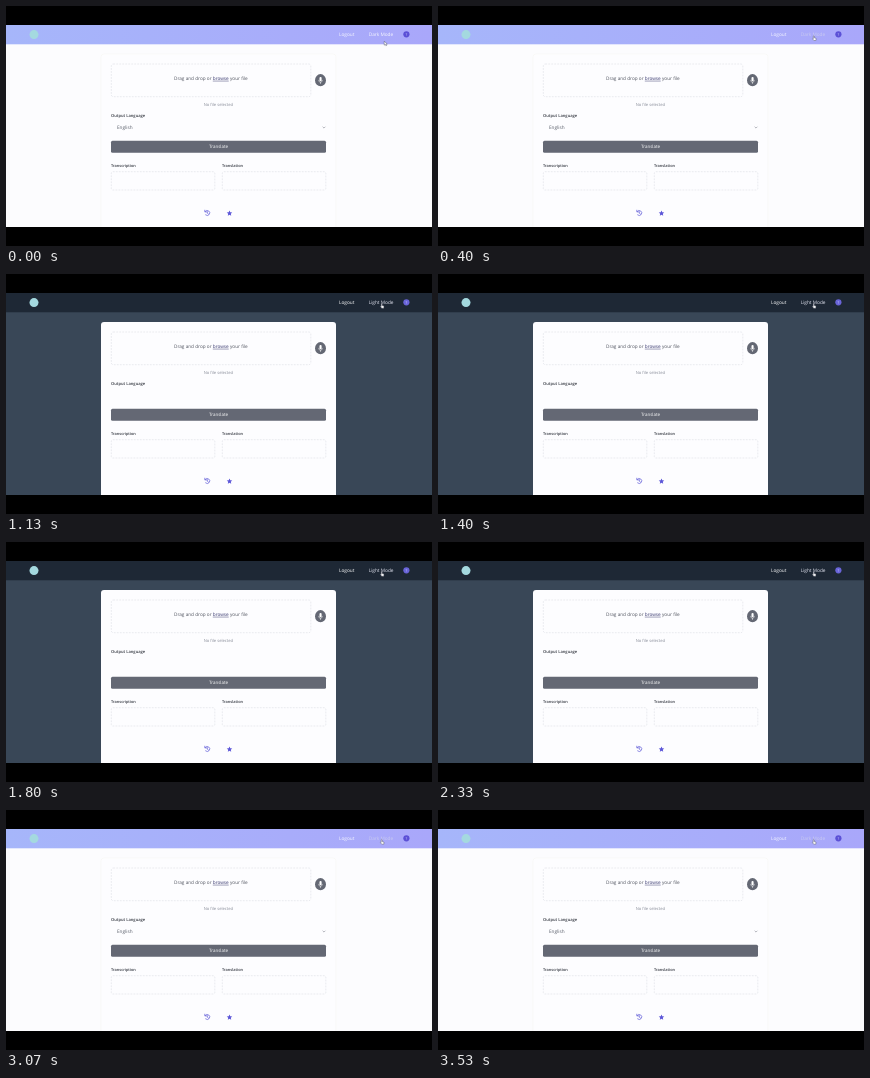
An HTML page for the animation above (3590 ms loop, 426 px wide and 240 px high).

```html
<!DOCTYPE html>
<html lang="en">
<head>
<meta charset="utf-8">
<title>Theme toggle</title>
<style>
  html, body { margin: 0; width: 100%; height: 100%; overflow: hidden; background: #000; }
  svg {
    display: block; width: 426px; height: 240px;
    font-family: "Open Sans", sans-serif; text-rendering: geometricPrecision;
    --page: #fcfcfe; --bar: url(#sky); --edge: #f7f7f4; --nav: #f6f7ff; --hover: #c9caf0; --help: #5b50d6;
  }
  svg.dark {
    --page: #394757; --bar: #1e2835; --edge: none; --nav: #fff; --hover: #e4e6f2; --help: #6964d8;
  }
  .dark .light-only { display: none; }
  .page { fill: var(--page); }
  .bar { fill: var(--bar); }
  .card { fill: #fdfdff; stroke: var(--edge); stroke-width: .6; }
  .nav { fill: var(--nav); font-size: 4.75px; font-weight: 500; }
  .hover { fill: var(--hover); }
  .help { fill: var(--help); }
  .mid { text-anchor: middle; }
  .bold { font-weight: 600; fill: #343841; }
  .dash { fill: none; stroke: #dcdde5; stroke-width: .6; stroke-dasharray: 1.8 1.2; }
  .solid { fill: #646874; }
  .line { fill: none; stroke-linecap: round; stroke-linejoin: round; }
</style>
</head>
<body>
<svg id="stage" viewBox="0 0 426 240">
  <defs>
    <linearGradient id="sky">
      <stop stop-color="#a6b6fa"/>
      <stop offset="1" stop-color="#a9a7fa"/>
    </linearGradient>
  </defs>
  <rect width="426" height="240"/>
  <rect class="page" y="19" width="426" height="202"/>
  <rect class="bar" y="19" width="426" height="19.3"/>
  <circle cx="28" cy="28.6" r="4.5" fill="#a4d9df"/>
  <text class="nav" x="333" y="30.4">Logout</text>
  <text class="nav" id="mode" x="362.7" y="30.4"></text>
  <circle class="help" cx="400.4" cy="28.3" r="3.1"/>
  <text class="mid" x="400.4" y="29.8" font-size="4" fill="#c9cbfa">?</text>

  <path class="card" d="M95 221V51q0-3 3-3H327q3 0 3 3V221"/>
  <rect class="dash" x="105.3" y="58" width="199.5" height="32.7" rx="2"/>
  <text x="168" y="73.8" font-size="4.7" fill="#50545f">Drag and drop or <tspan fill="#39396f" text-decoration="underline">browse</tspan> your file</text>
  <ellipse class="solid" cx="314.5" cy="74.2" rx="5.5" ry="6.1"/>
  <rect x="313.5" y="71" width="2.1" height="4.2" rx="1" fill="#fff"/>
  <path class="line" d="M312.7 74.3q0 2 1.8 2t1.8-2M314.5 76.3v1.2" stroke="#fff" stroke-width=".5"/>
  <text class="mid" x="212.4" y="100.4" font-size="4.13" fill="#858a96">No file selected</text>
  <text class="bold" x="105" y="111.3" font-size="4.08">Output Language</text>
  <g class="light-only">
    <text x="111" y="123.2" font-size="4.7" fill="#555a66">English</text>
    <path class="line" d="M316.9 121l1.1 1.1 1.1-1.1" stroke="#777b86" stroke-width=".55"/>
  </g>
  <rect class="solid" x="105" y="134.7" width="215" height="12" rx="1.5"/>
  <text class="mid" x="212.5" y="142.4" font-size="4.5" font-weight="500" fill="#fff">Translate</text>
  <text class="bold" x="105" y="161" font-size="3.9">Transcription</text>
  <text class="bold" x="216" y="161" font-size="3.9">Translation</text>
  <rect class="dash" x="105.3" y="165.7" width="103.5" height="18.3" rx="1.5"/>
  <rect class="dash" x="216.3" y="165.7" width="103.5" height="18.3" rx="1.5"/>
  <g class="line" stroke="#6662d8" stroke-width=".75">
    <path d="M199.2 205.5a2.5 2.5 0 1 1 .4 3.4M198.8 204.2v1.7h1.7M201.3 205.7v1.5l1 .7"/>
  </g>
  <path id="star" fill="#5b55d8"/>

  <g id="cursor" stroke="#3d4252" stroke-width=".4" fill="#fff" stroke-linejoin="round">
    <path id="arrow" d="M0 0v4l1-.9.7 1.5.7-.3-.7-1.5h1.4z"/>
    <path id="hand" d="M0 .4q.5-.8 1 0v1.8l1.8.5-.2 2.1H.5L-.8 3.1l.3-.4.5.3z"/>
  </g>
</svg>
<script>
  const LOOP = 3590, DARK_FROM = 1130, DARK_TO = 2730, MOVE_END = 460;
  const byId = id => document.getElementById(id);
  const stage = byId("stage"), mode = byId("mode"), cursor = byId("cursor");

  const starPoints = Array.from({ length: 10 }, (_, i) => {
    const radius = i % 2 ? 1.35 : 2.9, angle = i * Math.PI / 5;
    return [223.5 + radius * Math.sin(angle), 207.3 - radius * Math.cos(angle)];
  });
  byId("star").setAttribute("d", `M${starPoints.join("L")}Z`);

  function draw(now) {
    const time = now % LOOP;
    const dark = time >= DARK_FROM && time < DARK_TO;
    const progress = Math.min(1, time / MOVE_END);
    const ease = progress * progress * (3 - 2 * progress);
    const x = 378.2 - 3 * ease, y = 35.2 - 5.8 * ease;
    const hovering = y < 32.5;

    stage.classList.toggle("dark", dark);
    mode.classList.toggle("hover", hovering);
    mode.textContent = dark ? "Light Mode" : "Dark Mode";
    cursor.setAttribute("transform", `translate(${x} ${y})`);
    byId("arrow").style.display = hovering ? "none" : "";
    byId("hand").style.display = hovering ? "" : "none";
    requestAnimationFrame(() => draw(performance.now()));
  }
  draw(performance.now());
</script>
</body>
</html>
```
